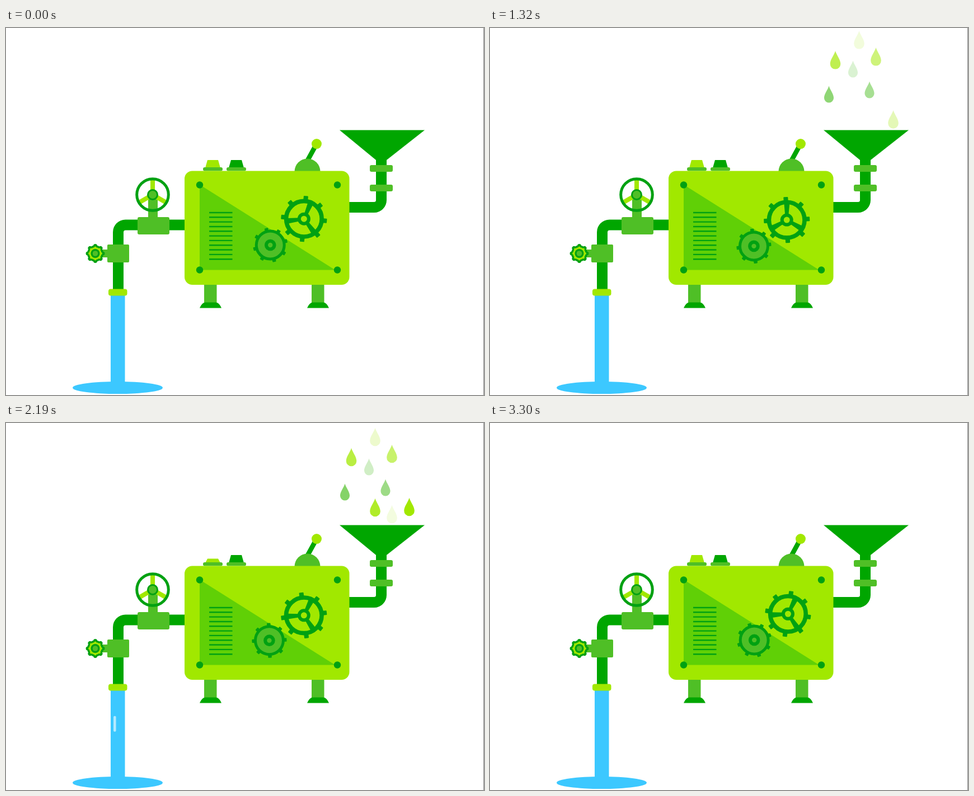
An HTML page with a canvas that plays this animation: 854 by 656 pixels, repeating every 3330 ms.

```html
<!DOCTYPE html>
<html lang="en">
<head>
<meta charset="utf-8">
<title>Drop machine</title>
<style>
  html, body { margin: 0; width: 100%; height: 100%; overflow: hidden; background: #fff; }
  canvas { display: block; }
</style>
</head>
<body>
<canvas id="stage" width="854" height="656"></canvas>
<script>
const ctx = document.getElementById('stage').getContext('2d');
const LOOP = 3330, STEP = 30, TAU = Math.PI * 2, DEG = Math.PI / 180;
const DARK = '#00a600', DEEP = '#00a112', MID = '#4fbf26', LIME = '#a1e800',
      SHADE = '#60d006', WATER = '#3cc8ff', SHINE = '#b4eaff';

const clamp = v => Math.max(0, Math.min(1, v));
const ramp = (t, from, to) => clamp((t - from) / (to - from));
const smooth = v => v * v * (3 - 2 * v);

function rect(x, y, w, h, color, r = 0) {
  ctx.fillStyle = color;
  ctx.beginPath();
  ctx.roundRect(x, y, w, h, r);
  ctx.fill();
}

function poly(color, ...points) {
  ctx.fillStyle = color;
  ctx.beginPath();
  for (let i = 0; i < points.length; i += 2) ctx.lineTo(points[i], points[i + 1]);
  ctx.fill();
}

function disc(x, y, r, color) {
  ctx.fillStyle = color;
  ctx.beginPath();
  ctx.arc(x, y, r, 0, TAU);
  ctx.fill();
}

function ring(x, y, r, width, color) {
  ctx.strokeStyle = color;
  ctx.lineWidth = width;
  ctx.beginPath();
  ctx.arc(x, y, r, 0, TAU);
  ctx.stroke();
}

function line(x1, y1, x2, y2, width, color) {
  ctx.strokeStyle = color;
  ctx.lineWidth = width;
  ctx.beginPath();
  ctx.moveTo(x1, y1);
  ctx.lineTo(x2, y2);
  ctx.stroke();
}

function pipe(x1, y1, cx, cy, x2, y2) {
  ctx.strokeStyle = DARK;
  ctx.lineWidth = 19;
  ctx.beginPath();
  ctx.moveTo(x1, y1);
  ctx.arcTo(cx, cy, x2, y2, 13);
  ctx.lineTo(x2, y2);
  ctx.stroke();
}

// Runs draw in a frame moved to x, y and turned, once per arm.
function around(x, y, turn, arms, draw) {
  for (let i = 0; i < arms; i++) {
    ctx.save();
    ctx.translate(x, y);
    ctx.rotate(turn + i * TAU / arms);
    draw();
    ctx.restore();
  }
}

// y is the height at age 480; fade-in starts at "from", fade-out at "out".
const drops = [
  { x: 617, y: 88, from: -20, out: 900 },
  { x: 689.5, y: 82, from: 50, out: 960 },
  { x: 659.5, y: 52, from: 215, out: 1110 },
  { x: 720.5, y: 51, from: 375, out: 1170 },
  { x: 605.5, y: 158.5, from: 0, green: true },
  { x: 678, y: 150.5, from: 60, green: true },
  { x: 648.5, y: 113.5, from: 185, green: true },
  { x: 732, y: 104, from: 385, green: true }
];
const dropStarts = [0, 1046, 1891];

function drawDrop(drop, age) {
  const speed = drop.green ? 0.194 : 0.149;
  const moved = drop.green ? age : Math.min(age, drop.out + 64);
  let alpha = ramp(age, drop.from, drop.from + 430);
  if (!drop.green) alpha *= 1 - ramp(age, drop.out, drop.out + 210);
  if (age <= 0 || alpha <= 0) return;
  const size = drop.green ? 0.92 : 1;
  ctx.save();
  ctx.globalAlpha = alpha;
  ctx.translate(drop.x, drop.y + (moved - 480) * speed);
  ctx.scale(size, size);
  ctx.fillStyle = drop.green ? MID : LIME;
  ctx.beginPath();
  ctx.moveTo(0, -16.3);
  ctx.bezierCurveTo(2, -9, 9.3, -1, 9.3, 7);
  ctx.arc(0, 7, 9.3, 0, Math.PI);
  ctx.bezierCurveTo(-9.3, -1, -2, -9, 0, -16.3);
  ctx.fill();
  ctx.restore();
}

function drawDrops(t) {
  ctx.save();
  ctx.beginPath();
  ctx.rect(580, 0, 190, 183);
  ctx.clip();
  for (const start of dropStarts)
    for (const drop of drops) drawDrop(drop, t - start);
  ctx.restore();
}

function drawFunnel() {
  pipe(670.5, 232, 670.5, 320.5, 612, 320.5);
  poly(DARK, 596, 182.5, 748, 182.5, 680, 236, 661, 236);
  rect(650, 245, 41, 12, MID, 3);
  rect(650, 280, 41, 12, MID, 3);
}

function drawWater(t) {
  rect(187, 476, 25.5, 164, WATER);
  ctx.save();
  ctx.beginPath();
  ctx.rect(187, 478.5, 25.5, 154);
  ctx.clip();
  for (const start of [300, 2028]) {
    const age = t - start;
    if (age > 0 && age < 560) rect(192, 478.5 + age * 0.28, 4.6, 28, SHINE, 2);
  }
  ctx.restore();
  ctx.fillStyle = WATER;
  ctx.beginPath();
  ctx.ellipse(199.5, 643, 80.5, 11, 0, 0, TAU);
  ctx.fill();
}

function drawOutlet() {
  pipe(320, 352, 200.5, 352, 200.5, 468);
  rect(183, 466.5, 33.5, 12, LIME, 4);

  rect(254, 298, 17, 42, MID);
  rect(235, 338, 57, 31, MID, 3);
  around(262, 298, -Math.PI / 2, 3, () => rect(8, -4, 19, 8, LIME));
  ring(262, 298, 28.3, 5, DEEP);
  disc(262, 298, 10, DEEP);
  disc(262, 298, 7, MID);

  rect(172, 396, 10, 14, MID);
  rect(181, 387, 39, 32, MID, 2);
  disc(159.5, 403, 14.5, DEEP);
  around(159.5, 403, 0, 8, () => disc(13.3, 0, 3.6, DEEP));
  disc(159.5, 403, 11, LIME);
  around(159.5, 403, 0, 8, () => disc(10.5, 0, 2, LIME));
  disc(159.5, 403, 8, DEEP);
  disc(159.5, 403, 4.8, MID);
}

function drawKnob(x, color, press) {
  const top = 236 + press * 6.5;
  poly(color, x + 8, top, x + 27, top, x + 31, 250, x + 4, 250);
  rect(x, 249, 35, 6.5, MID, 3);
}

function drawLever(t) {
  const swing = Math.sin(Math.PI * ramp(t, 400, 800)) ** 2;
  const angle = (28.7 - 25 * swing) * DEG;
  const x = 538 + 35.3 * Math.sin(angle), y = 238 - 35.3 * Math.cos(angle);
  line(538, 238, x, y, 8.5, DARK);
  disc(x, y, 9, LIME);
  ctx.fillStyle = MID;
  ctx.beginPath();
  ctx.arc(538.5, 256.5, 23, Math.PI, TAU);
  ctx.fill();
}

function drawLeg(x) {
  rect(x, 456, 22.5, 36, MID);
  ctx.fillStyle = DARK;
  ctx.beginPath();
  ctx.moveTo(x - 8, 500.5);
  ctx.quadraticCurveTo(x - 4, 491, x + 2, 490.5);
  ctx.lineTo(x + 21, 490.5);
  ctx.quadraticCurveTo(x + 27, 491, x + 31, 500.5);
  ctx.fill();
}

function drawBigGear(turn) {
  const tilt = turn - 60 * DEG;
  const x = 531.6 + 1.5 * Math.cos(tilt), y = 342.5 + 1.5 * Math.sin(tilt);
  ring(x, y, 31.8, 7.6, DEEP);
  around(x, y, turn - 85 * DEG, 8, () => rect(33, -4, 8, 8, DEEP, 1));
  around(x, y, turn - 67 * DEG, 3, () => poly(DEEP, 8, -3, 30, -5, 30, 5, 8, 3));
  disc(x, y, 11.5, DEEP);
  disc(x, y, 5.5, LIME);
}

function drawSmallGear(turn) {
  const tilt = turn - 50 * DEG;
  const x = 471.5 + 1.1 * Math.cos(tilt), y = 388.8 + 1.1 * Math.sin(tilt);
  around(x, y, turn - 59 * DEG, 8, () => rect(25, -3.2, 6, 6.4, DEEP, 1));
  disc(x, y, 25, MID);
  ring(x, y, 25, 5, DEEP);
  disc(x, y, 10.3, DEEP);
  disc(x, y, 4.2, MID);
}

function drawMachine(t) {
  const press = smooth(ramp(t, 1430, 1550)) * (1 - smooth(ramp(t, 2430, 2550)));
  drawKnob(352, LIME, press);
  drawKnob(394, DARK, 0);
  drawLever(t);
  drawLeg(354);
  drawLeg(546);

  rect(319, 255.5, 294.5, 203.5, LIME, 14);
  poly(SHADE, 346, 280, 588, 432.5, 346, 432.5);
  for (let i = 0; i < 11; i++) {
    const y = 330 + i * 8.32;
    line(363, y, 404.5, y, 2.4, DEEP);
  }
  const turn = t / LOOP * TAU;
  drawSmallGear(turn);
  drawBigGear(-turn);
  for (const x of [346, 592])
    for (const y of [280.5, 432.5]) disc(x, y, 6.2, DEEP);
}

function draw(t) {
  rect(0, 0, 854, 656, '#fff');
  drawDrops(t);
  drawFunnel();
  drawWater(t);
  drawOutlet();
  drawMachine(t);
  rect(853, 0, 1, 656, '#858585');
}

let begin;
function tick(now) {
  begin ??= now;
  const t = (now - begin) % LOOP;
  draw(Math.floor(t / STEP) * STEP);
  requestAnimationFrame(tick);
}
draw(0);
requestAnimationFrame(tick);
</script>
</body>
</html>
```
